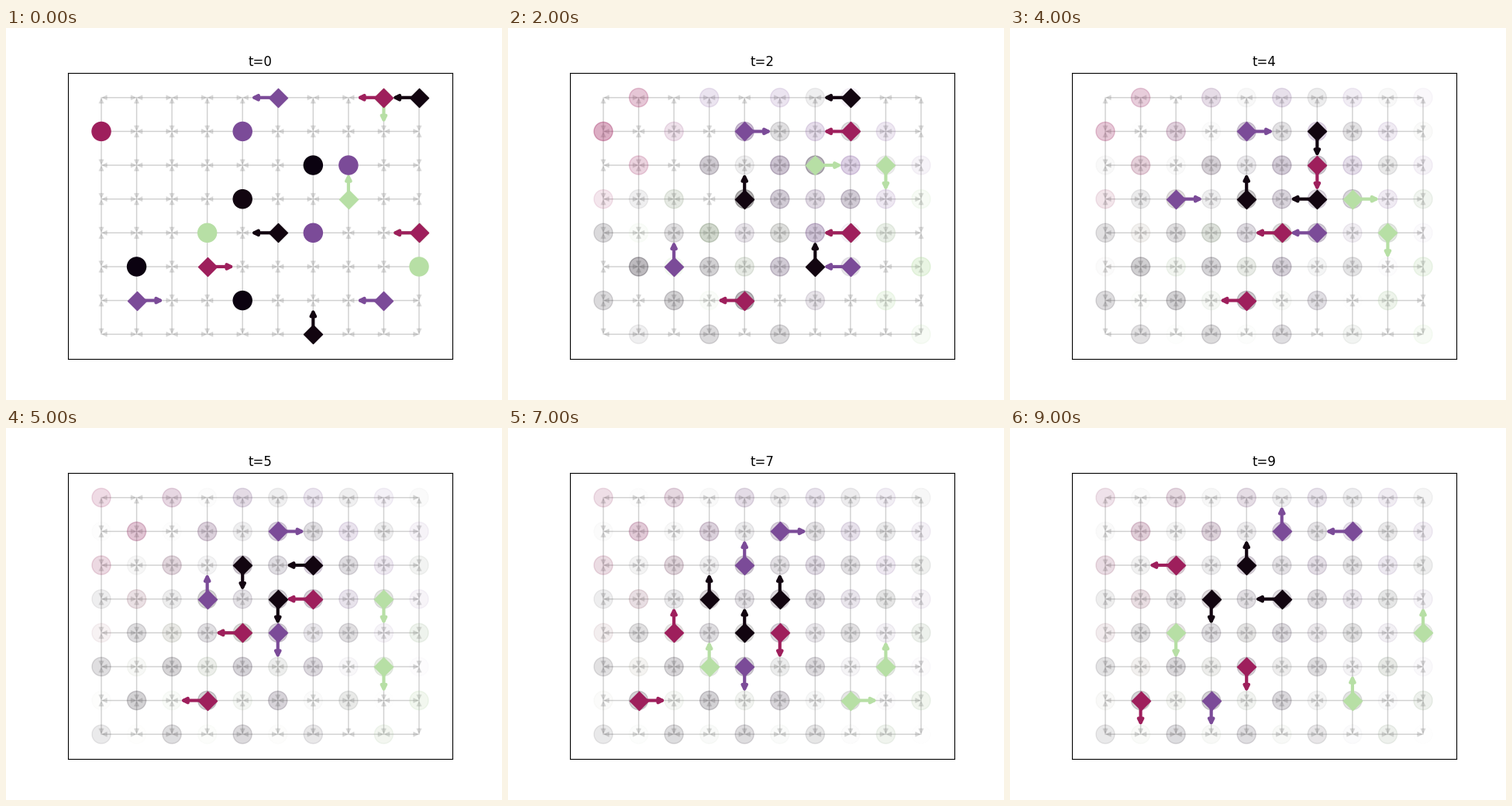
A matplotlib script for the animation above (10000 ms loop, 640x480 px).

```python
import numpy as np
import matplotlib.pyplot as plt
from matplotlib.animation import FuncAnimation
from matplotlib.patches import FancyArrowPatch

COLS, ROWS, STEPS = 10, 8, 10
RED, PURPLE, GREEN = "#9e1f5c", "#7b4b98", "#b7dfa5"
BLACK, INK = "#0b0210", "#120510"
MOVES = {"L": (-1, 0), "R": (1, 0), "U": (0, -1), "D": (0, 1)}

# start cell and colour of each random walker
WALKERS = [
    ((0, 1), RED), ((4, 1), PURPLE), ((7, 2), PURPLE), ((6, 4), PURPLE),
    ((3, 4), GREEN), ((9, 5), GREEN), ((6, 2), BLACK), ((4, 3), INK),
    ((1, 5), BLACK), ((4, 6), BLACK),
]

# start cell, heading at each step and colour of each agent
AGENTS = [
    ((7, 3), "ULRDRDDURU", GREEN),
    ((8, 0), "DDDDDDLRLU", GREEN),
    ((9, 4), "LLLLLLDULD", GREEN),
    ((9, 0), "LLLDDLDUDL", INK),
    ((5, 4), "LUUDUDLUDD", INK),
    ((6, 7), "UUUULDLUUU", INK),
    ((5, 0), "LDRLRRLRRL", PURPLE),
    ((1, 6), "RUUURURURU", PURPLE),
    ((8, 6), "LULULDLDLD", PURPLE),
    ((8, 0), "LDLDDLDDLD", RED),
    ((9, 4), "LLLLLLLUUL", RED),
    ((3, 5), "RDLRLLLRLD", RED),
]


def neighbours(c, r):
    cells = [(c + dx, r + dy) for dx, dy in MOVES.values()]
    return [(x, y) for x, y in cells if 0 <= x < COLS and 0 <= y < ROWS]


def spread(p):
    """One step of an unbiased random walk on the grid."""
    q = np.zeros_like(p)
    for r in range(ROWS):
        for c in range(COLS):
            near = neighbours(c, r)
            for x, y in near:
                q[y, x] += p[r, c] / len(near)
    return q


def beliefs(start):
    p = np.zeros((ROWS, COLS))
    p[start[1], start[0]] = 1
    out = [p]
    while len(out) < STEPS:
        out.append(spread(out[-1]))
    return out


def route(start, heads):
    cells = [start]
    for h in heads:
        x, y = cells[-1]
        cells.append((x + MOVES[h][0], y + MOVES[h][1]))
    return cells


def arrow(a, b, color, shrink, **kw):
    patch = FancyArrowPatch(a, b, arrowstyle="-|>", mutation_scale=10,
                            color=color, shrinkA=0, shrinkB=shrink, **kw)
    ax.add_patch(patch)
    return patch


fig, ax = plt.subplots(figsize=(6.4, 4.8), dpi=100)
cell_w, cell_h = 410 / 9, 305.4 / 7
ax.set_xlim((80 - 123) / cell_w, (576 - 123) / cell_w)
ax.set_ylim((427.2 - 89.8) / cell_h, (57.6 - 89.8) / cell_h)
ax.set_xticks([])
ax.set_yticks([])
title = ax.set_title("t=0")

for r in range(ROWS):
    for c in range(COLS):
        for cell in neighbours(c, r):
            arrow((c, r), cell, "gray", 0, alpha=0.2, lw=1, zorder=1)

gx, gy = np.meshgrid(np.arange(COLS), np.arange(ROWS))
clouds = []
for start, color in WALKERS:
    dots = ax.scatter(gx.ravel(), gy.ravel(), s=300, color=color, zorder=2)
    clouds.append((dots, beliefs(start)))

team = []
for i, (start, heads, color) in enumerate(AGENTS):
    z = 3 + i / 100
    path = route(start, heads)
    pointer = arrow(path[0], path[1], color, 7.5, lw=3, zorder=z)
    body = ax.scatter(*start, s=150, marker="D", color=color, zorder=z)
    team.append((pointer, body, path))


def update(t):
    title.set_text(f"t={t}")
    for dots, probs in clouds:
        dots.set_alpha(np.clip(probs[t].ravel(), 0, 1))
    for pointer, body, path in team:
        pointer.set_positions(path[t], path[t + 1])
        body.set_offsets([path[t]])
    return []


anim = FuncAnimation(fig, update, frames=STEPS, init_func=lambda: update(0),
                     interval=1000, repeat=True, repeat_delay=0)
plt.show()
```
